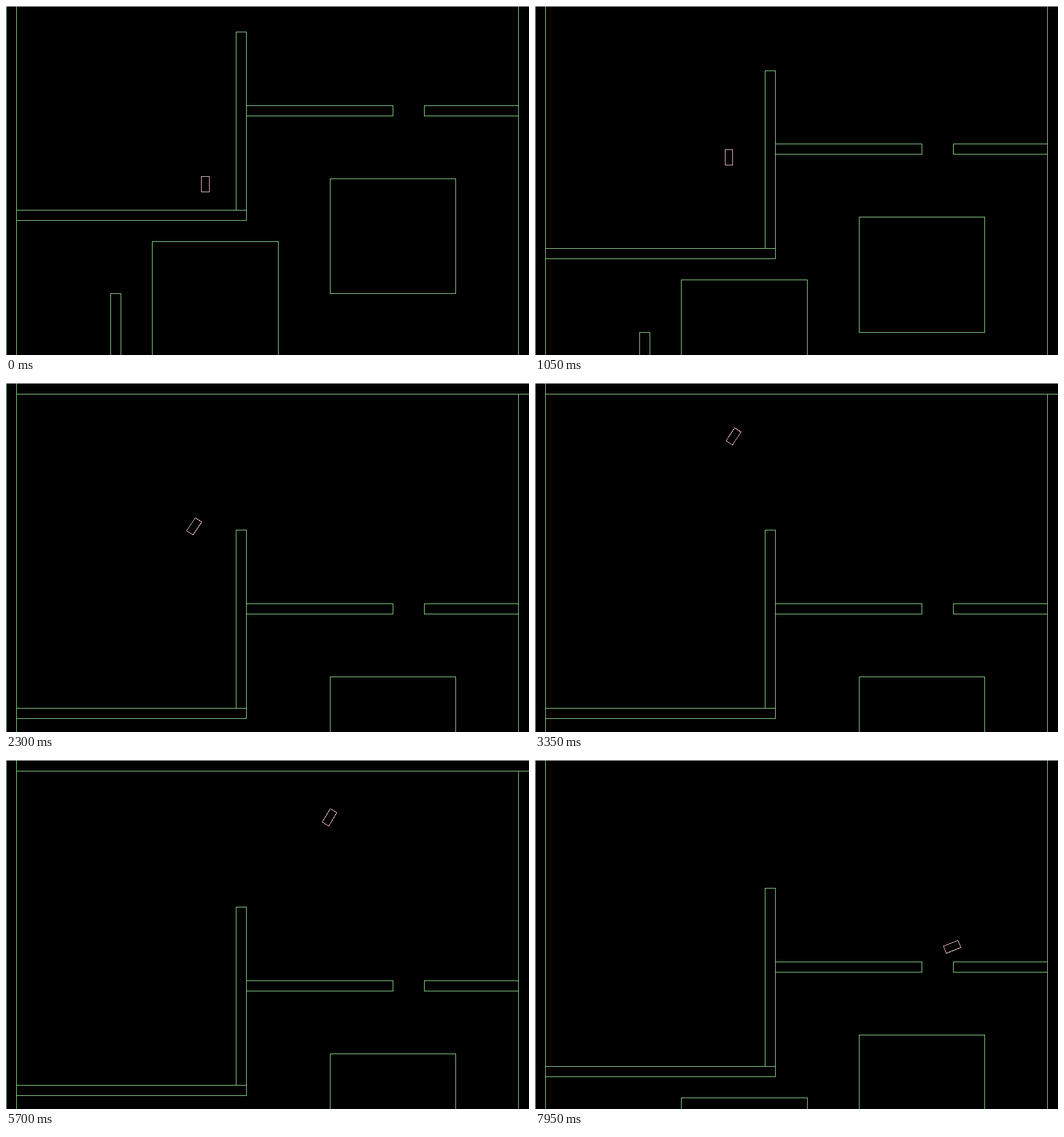
An HTML page for the animation above (8000 ms loop, 917 px wide and 611 px high).

```html
<!DOCTYPE html>
<html lang="en">
<head>
<meta charset="utf-8">
<title>Top-down drive</title>
<style>
  html, body { margin: 0; width: 100%; height: 100%; overflow: hidden; background: #000; }
  svg { display: block; width: 917px; height: 611px; }
  path { fill: none; stroke-width: 1; shape-rendering: crispEdges; }
</style>
</head>
<body>
<svg viewBox="0 0 917 611">
  <path id="walls" stroke="#96e896"/>
  <path stroke="#d8e6d8" d="M0 .5H917"/>
  <path id="car" stroke="#ffc8cf" d="M-6.7 -13.7H6.7V13.7H-6.7Z"/>
</svg>
<script>
const LOOP = 8000, STEP = 50;
const TILE_X = 18.34, TILE_Y = 18.32;
const CAM_TOP = -0.8, CAM_START = 211.1; // camera range in the map
const UPPER = 265, LOWER = 341.2;        // the camera follows outside this band
const TURN_BACK = 4400, BOUNCE = 7740;   // car reaches the top wall, then the lower one
const walls = document.getElementById('walls');
const car = document.getElementById('car');

// Waypoints in the map: time, x, y, heading
const route = [
  [0, 349.5, 523, 0],
  [1050, 340, 408.9, 0],
  [1550, 334.8, 342.3, 33.5],
  [2300, 329.9, 250.2, 33.5],
  [3400, 349.5, 85.5, 33.5],
  [3780, 370, 34, 33.5],
  [TURN_BACK, 418.4, 28.5, 98.4],
  [5100, 501.7, 63, 186],
  [5950, 592, 119.5, 214],
  [7000, 680, 258.7, 174],
  [BOUNCE, 730, 373.2, 236],
  [7950, 731.4, 359.2, 248.2]
];
const X = 1, Y = 2, HEADING = 3;

const clamp = (v, lo, hi) => Math.min(hi, Math.max(lo, v));

const slope = (i, col) =>
  (route[i + 1][col] - route[i][col]) / (route[i + 1][0] - route[i][0]);

function tangent(i, col) {
  if (i === 0) return slope(0, col);
  if (i === route.length - 1) return slope(i - 1, col);
  const a = slope(i - 1, col), b = slope(i, col);
  return a * b <= 0 ? 0 : 2 * a * b / (a + b);
}

// Monotone cubic along the route
function along(col, t) {
  let i = 0;
  while (i < route.length - 2 && t > route[i + 1][0]) i++;
  const h = route[i + 1][0] - route[i][0];
  const u = (t - route[i][0]) / h, v = 1 - u;
  return v * v * (1 + 2 * u) * route[i][col] + u * u * (3 - 2 * u) * route[i + 1][col] +
    h * u * v * (v * tangent(i, col) - u * tangent(i + 1, col));
}

function cameraY(t) {
  const edge = t < TURN_BACK ? UPPER : LOWER;
  return clamp(along(Y, Math.min(t, BOUNCE)) - edge, CAM_TOP, CAM_START);
}

function wallPath(cam) {
  const px = n => Math.floor(n * TILE_X + 0.17) + 0.5;
  const py = n => Math.round(n * TILE_Y - cam) + 0.5;
  const box = (x, y, w, h) => `M${px(x)} ${py(y)}H${px(x + w)}V${py(y + h)}H${px(x)}Z`;
  const ceiling = Math.max(0, py(1));
  return `M.5 0V611M${px(1)} 0V611M${px(49)} ${ceiling}V611` +
    (ceiling ? `M${px(1)} ${ceiling}H917` : '') +
    box(22, 14, 1, 17) + box(1, 31, 22, 1) +   // left room
    box(23, 21, 14, 1) + box(40, 21, 9, 1) +   // wall with a doorway
    box(31, 28, 12, 11) + box(14, 34, 12, 20) + // blocks
    box(10, 39, 1, 20);
}

function draw(t) {
  const cam = cameraY(t);
  walls.setAttribute('d', wallPath(cam));
  car.setAttribute('transform',
    `translate(${along(X, t)} ${along(Y, t) - cam}) rotate(${along(HEADING, t)})`);
}

const start = performance.now();
function tick() {
  const t = (performance.now() - start) % LOOP;
  draw(Math.floor(t / STEP) * STEP);
  requestAnimationFrame(tick);
}
tick();
</script>
</body>
</html>
```
